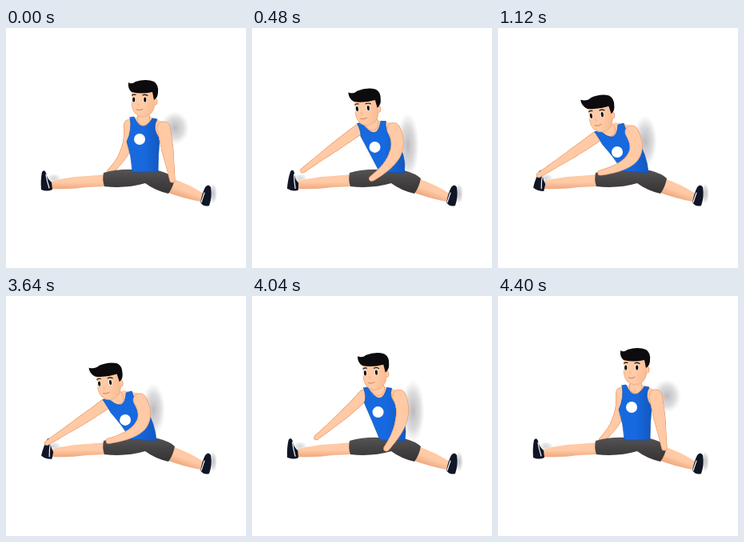
Recreate the animation shown at these times as an HTML page with a canvas. Size 300 px wide and 300 px high, loop 4.84 s.

```html
<!DOCTYPE html>
<html lang="en">
<head>
<meta charset="utf-8">
<title>Seated side stretch</title>
<style>
html, body { margin: 0; width: 100%; height: 100%; overflow: hidden; background: #fff; }
canvas { display: block; width: 100vw; height: 100vh; }
</style>
</head>
<body>
<canvas id="stage" width="300" height="300"></canvas>
<script>
const ctx = document.getElementById('stage').getContext('2d');
const LOOP = 4840, STEP = 40;
const SKIN = '#ffcaa5', RIM = '#eda57c', INK = '#0d0b0d', NAVY = '#101626';

// Each point lists x,y for sitting upright, halfway, and reaching the foot.
const leftArm = [[154, 121, 142, 123, 123, 136], [149, 153, 121, 147, 94, 156], [129, 180, 87, 177, 51, 184]];
const rightArm = [[197, 125, 186, 125, 167, 130], [202, 153, 189, 155, 168, 162], [208, 190, 174, 191, 128, 181]];
const chest = [[151, 119, 138, 121, 118, 133], [164, 111, 150, 113, 130, 126], [181, 111, 169, 113, 147, 118],
  [200, 119, 189, 119, 168, 122], [194, 140, 185, 139, 175, 142], [153, 142, 144, 136, 132, 146]];
const neck = [[172, 105, 159, 107, 135, 121], [172, 109, 160, 111, 137, 124], [172, 114, 160, 116, 139, 128]];
const shirt = [[155, 112, 142, 114, 121, 130], [160, 111, 147, 113, 126, 127], [170, 134, 163, 140, 148, 148],
  [183, 113, 171, 114, 150, 121], [189, 114, 177, 115, 157, 119], [182, 126, 172, 127, 159, 130],
  [192, 138, 183, 137, 174, 140], [190, 160, 195, 158, 186, 158], [190, 180, 191, 181, 188, 181],
  [158, 180, 160, 180, 156, 179], [157, 160, 152, 158, 144, 160], [151, 142, 142, 134, 131, 146],
  [158, 127, 146, 126, 127, 139]];
const emblem = [167, 139, 159, 144, 149, 155];
const headAt = [171, 93, 156, 98, 128, 112];
const shadowAt = [211, 125, 203, 142, 184, 142];
const shadowSize = [18, 21, 15, 38, 15, 33];

const leftLeg = 'M124 183Q104 185 86 186Q70 188 56 192L57 201Q80 202 101 199L125 198Z';
const rightLeg = 'M210 189Q228 195 247 207L243 217Q222 213 203 206Z';
const shorts = 'M122 181Q140 176 160 177L190 178Q205 182 211 188Q209 199 203 207Q186 203 174 194Q150 201 123 198Q120 190 122 181Z';
const leftShoe = 'M45 180Q48 176 50 181Q51 188 57 193L58 202Q51 205 44 202Q43 190 45 180Z';
const rightShoe = 'M243 218Q245 207 249 199Q253 194 256 199Q258 211 254 222Q247 224 243 218Z';

let weights;
const at = p => [0, 1].map(i => p[i] * weights[0] + p[i + 2] * weights[1] + p[i + 4] * weights[2]);

function fill(path, color) {
  ctx.fillStyle = color;
  ctx.fill(new Path2D(path));
}

function line(path, color, width) {
  ctx.strokeStyle = color;
  ctx.lineWidth = width;
  ctx.lineCap = 'round';
  ctx.stroke(new Path2D(path));
}

function oval(x, y, rx, ry, color) {
  ctx.fillStyle = color;
  ctx.beginPath();
  ctx.ellipse(x, y, rx, ry, 0, 0, 7);
  ctx.fill();
}

function placed(x, y, angle, draw) {
  ctx.save();
  ctx.translate(x, y);
  ctx.rotate(angle);
  draw();
  ctx.restore();
}

function gradient(x0, y0, x1, y1, ...colors) {
  const g = ctx.createLinearGradient(x0, y0, x1, y1);
  colors.forEach((c, i) => g.addColorStop(i / (colors.length - 1), c));
  return g;
}

function softShadow(x, y, rx, ry, alpha) {
  placed(x, y, 0, () => {
    ctx.scale(rx, ry);
    const g = ctx.createRadialGradient(0, 0, 0, 0, 0, 1);
    g.addColorStop(0, `rgba(150,150,155,${alpha})`);
    g.addColorStop(.6, `rgba(165,165,170,${alpha * .6})`);
    g.addColorStop(1, 'rgba(190,190,190,0)');
    oval(0, 0, 1, 1, g);
  });
}

// Tapered limb along a curve passing through its middle joint.
function limb(joints, radii) {
  const [a, m, b] = joints.map(at);
  const along = (s, e, n, t) => (1 - t) * (1 - 2 * t) * s + 4 * t * (1 - t) * e + t * (2 * t - 1) * n;
  for (const [color, grow] of [[RIM, 0], [SKIN, -.8]]) {
    for (let t = 0; t <= 1.001; t += .02) {
      const r = t < .5 ? radii[0] + (radii[1] - radii[0]) * t * 2 : radii[1] + (radii[2] - radii[1]) * (t * 2 - 1);
      oval(along(a[0], m[0], b[0], t), along(a[1], m[1], b[1], t), r + grow, r + grow, color);
    }
  }
}

function drawLegs(p) {
  softShadow(259, 207, 5, 13, .6);
  softShadow(60, 188, 9, 6, .4);
  fill(leftLeg, gradient(0, 183, 0, 202, SKIN, SKIN, RIM));
  fill(rightLeg, gradient(228, 194, 221, 213, SKIN, SKIN, RIM));
  placed(52, 201, Math.max(0, p - .35) * .48, () => {
    ctx.translate(-52, -201);
    fill(leftShoe, NAVY);
    line('M50 183Q51 191 54 200', '#fff', 1.2);
  });
  fill(rightShoe, NAVY);
  line('M248 206L244 218', '#fff', 1.2);
}

function drawTorso() {
  fill('M' + chest.map(at).join('L') + 'Z', SKIN);
  limb(neck, [7, 7, 8]);
  const s = shirt.map(at);
  const path = `M${s[0]}L${s[1]}Q${s[2]} ${s[3]}L${s[4]}Q${s[5]} ${s[6]}Q${s[7]} ${s[8]}L${s[9]}Q${s[10]} ${s[11]}Q${s[12]} ${s[0]}Z`;
  fill(path, gradient(s[11][0], 0, s[8][0] + 4, 0, '#1769df', '#1769df', '#1256bd'));
  line(path, '#0f4fae', .7);
  oval(...at(emblem), 7, 7, '#fff');
}

function drawHead(p, open) {
  placed(...at(headAt), -.12 * p, () => {
    oval(15, -1, 3.5, 4.5, RIM);
    oval(14.5, -1, 3, 4, SKIN);
    const face = 'M-14 -15L-14 2Q-13 17 0 18Q13 17 15 3L15 -15Z';
    fill(face, gradient(-14, 0, 16, 6, SKIN, SKIN, '#f9b98f'));
    line('M-14 1Q-13 17 0 18Q13 17 15 3', RIM, .7);
    fill(`M${-14 - p} -13Q${-19 - 3 * p} -17 ${-18 - 4 * p} -25Q-14 -22 -9 -26Q4 -30 14 -26Q20 -22 19 -13Q19 -6 14 -3L12 -13Q-2 -10 ${-14 - p} -13Z`, INK);
    for (const x of [-11.5, 2.5]) {
      oval(x, -3.5, 2.4, 3.3 * open + .2, '#fff');
      oval(x + .2, -3.5, 1.6, 2.7 * open + .4, INK);
    }
    line('M-13.5 -9Q-11 -10.5 -9 -9.5M0 -9Q3 -10.5 6 -8.5', INK, 1.1);
    line('M-6 1Q-8 3 -5 3.5', RIM, .8);
    line('M-8 9Q-4 11 0 8.5', '#c9785a', .9);
  });
}

const ease = t => .5 - .5 * Math.cos(Math.PI * Math.min(1, Math.max(0, t)));

function frame(now) {
  const time = Math.floor(now % LOOP / STEP) * STEP;
  const p = ease(time / 800) - ease((time - 3600) / 800);
  const open = Math.min(1, Math.abs(time - 1060) < 60 ? Math.abs(time - 1040) / 80 : 1);
  weights = [(p - .35) * (p - 1) / .35, p * (1 - p) / .2275, p * (p - .35) / .65];

  ctx.fillStyle = '#fff';
  ctx.fillRect(0, 0, 300, 300);
  softShadow(...at(shadowAt), ...at(shadowSize), .65);
  drawLegs(p);
  limb(leftArm, [7, 6, 3.2]);
  fill(shorts, gradient(0, 177, 0, 204, '#565354', '#454344', '#373536'));
  drawTorso();
  limb(rightArm, [8.5, 7.5, 3.6]);
  drawHead(p, open);
  requestAnimationFrame(frame);
}

const start = performance.now();
requestAnimationFrame(() => {
  (function tick() {
    frame(Math.max(0, performance.now() - start));
  })();
});
</script>
</body>
</html>
```
